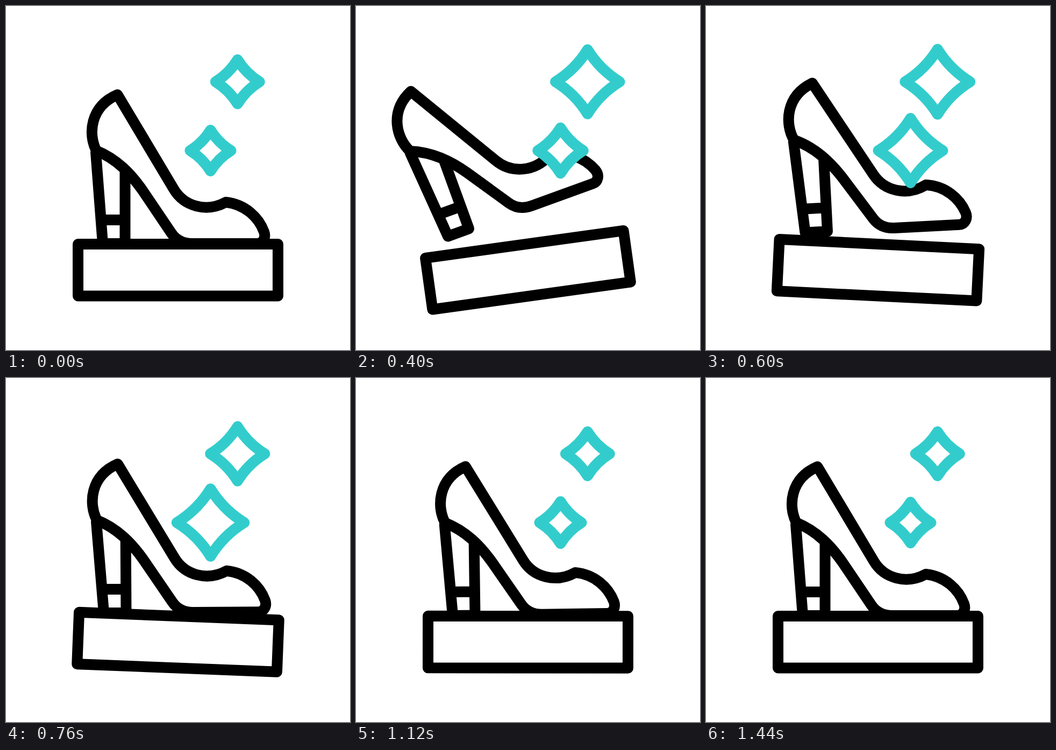
Animation, 640 px wide and 640 px high, one loop 1520 ms. Source, as an HTML page:

```html
<!DOCTYPE html>
<html lang="en">
<head>
<meta charset="utf-8">
<title>Shoe display</title>
<style>
  html, body { margin: 0; width: 100%; height: 100%; overflow: hidden; background: #fff; }
  svg { display: block; width: 100%; height: 100%; }
</style>
</head>
<body>
<svg viewBox="0 0 640 640" fill="none" stroke="#000" stroke-width="20" stroke-linecap="round" stroke-linejoin="round">
  <rect id="base" x="134" y="443" width="372" height="96.5"/>
  <g id="shoe">
    <path d="M207.4 165 L312.4 341 C331 372 372 385 409 365 C445 369 470 393 480 420
      C484 431 478 442 467 442 H346 C330 442 317 436 308 423 L254 343
      C233 313 207 285 168 269 C152.5 239 156 187 207.4 165 Z"/>
    <path d="M167 272 L180 442 H221.5 V308 M177 398 H221.5"/>
  </g>
  <g stroke="#33cccc" fill="#fff">
    <path id="big"/>
    <path id="small"/>
  </g>
</svg>
<script>
const LOOP = 1520;
const el = id => document.getElementById(id);
const base = el('base'), shoe = el('shoe'), big = el('big'), small = el('small');

// Smooth 0 to 1 between two times.
function ease(t, from, to) {
  const p = Math.min(1, Math.max(0, (t - from) / (to - from)));
  return p * p * (3 - 2 * p);
}

// Rises to 1 at the peak, then falls back to 0; hold keeps it up for a while.
const swell = (t, from, peak, to, hold = 0) =>
  ease(t, from, peak) - ease(t, peak + hold, to);

// Four-pointed star with edges curved towards its centre.
function star(x, y, r) {
  const c = r * 0.38;
  let d = `M${x} ${y - r}`;
  for (let i = 0; i < 4; i++) {
    const a = i * Math.PI / 2, cos = Math.cos(a), sin = Math.sin(a);
    d += `Q${x + c * (cos + sin)} ${y + c * (sin - cos)} ${x + r * cos} ${y + r * sin}`;
  }
  return d + 'Z';
}

function draw(t) {
  // The plinth tips left, swings past level and settles.
  const tilt = -7.9 * swell(t, 0, 400, 600) + 2.8 * swell(t, 400, 600, 1160);
  base.setAttribute('transform', `rotate(${tilt} 320 491.25)`);

  // The shoe leans back on its heel, hops, lands and rocks once more.
  const lean = -20 * swell(t, 90, 400, 665) - 2 * swell(t, 690, 960, 1240);
  const x = -9 * swell(t, 80, 400, 600) + 4.5 * swell(t, 400, 600, 900);
  const y = -24 * swell(t, 260, 520, 860);
  shoe.setAttribute('transform', `translate(${x} ${y}) rotate(${lean} 180 442)`);

  big.setAttribute('d', star(430.8, 141, 41 + 20.5 * swell(t, 92, 470, 960, 75)));
  small.setAttribute('d', star(380.5, 269, 38 + 25.3 * swell(t, 300, 690, 1175, 30)));
}

const start = performance.now();
function tick() {
  draw((performance.now() - start) % LOOP);
  requestAnimationFrame(tick);
}
tick();
</script>
</body>
</html>
```
